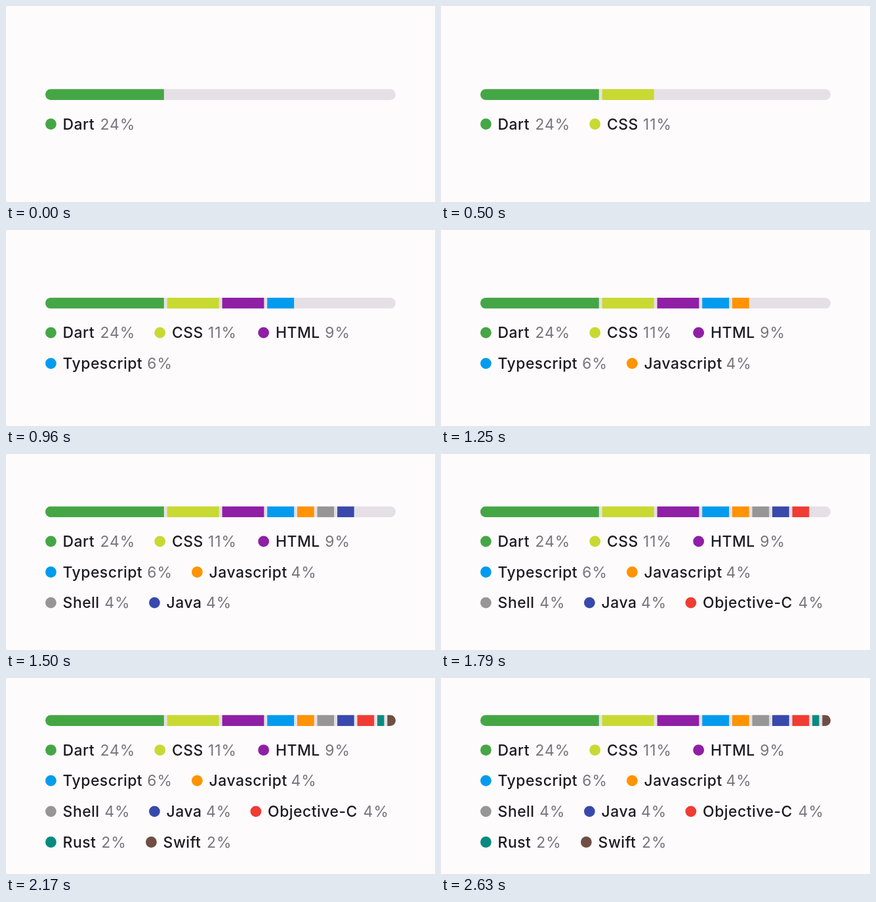
Animation of 654x298 px, one loop 2680 ms. Source, as an HTML page:

```html
<!DOCTYPE html>
<html lang="en">
<head>
<meta charset="utf-8">
<title>Language bar</title>
<style>
  html, body { margin: 0; width: 100%; height: 100%; overflow: hidden; background: #fefbfc; }
  svg { display: block; width: 654px; height: 298px; }
  text { font: 500 22.9px Inter, "Open Sans", sans-serif; letter-spacing: .5px; fill: #1c1b1f; }
  .share { font-weight: 400; letter-spacing: 1px; fill: #77747a; }
</style>
</head>
<body>
<svg viewBox="0 0 654 298">
  <defs>
    <clipPath id="pill"><rect x="60" width="534" height="16.7" rx="8.35"/></clipPath>
  </defs>
  <g id="chart">
    <g id="bar" clip-path="url(#pill)">
      <rect x="60" width="534" height="16.7" fill="#e5e0e6"/>
    </g>
  </g>
</svg>
<script>
  const LOOP = 2680, FIRST = 500, STEP = 189;
  const LEFT = 60, WIDTH = 534, ROW = 46.65, TOP = 126.2;

  // name, percent, colour, row, dot left, percent left
  const langs = [
    ['Dart', 24, '#45a645', 0, 60, 143.4],
    ['CSS', 11, '#c8d932', 0, 226.3, 308],
    ['HTML', 9, '#8f1fa5', 0, 384.3, 486.2],
    ['Typescript', 6, '#039bee', 1, 60, 215.2],
    ['Javascript', 4, '#ff9300', 1, 283, 434.5],
    ['Shell', 4, '#969696', 2, 60, 150.3],
    ['Java', 4, '#3849ab', 2, 218, 305],
    ['Objective-C', 4, '#f03c33', 2, 372.5, 544.6],
    ['Rust', 2, '#078b7e', 3, 60, 145.2],
    ['Swift', 2, '#6f4e43', 3, 213, 306]
  ];

  const chart = document.getElementById('chart');
  const bar = document.getElementById('bar');
  const total = langs.reduce((sum, lang) => sum + lang[1], 0);

  function add(parent, tag, attrs, text) {
    const el = document.createElementNS('http://www.w3.org/2000/svg', tag);
    for (const key in attrs) el.setAttribute(key, attrs[key]);
    if (text) el.textContent = text;
    parent.appendChild(el);
    return el;
  }

  let used = 0;
  const items = langs.map(([name, percent, fill, row, x, shareX], i) => {
    const start = LEFT + WIDTH * used / total + (i ? 2.6 : 0);
    used += percent;
    const end = LEFT + WIDTH * used / total - (used < total ? 2.3 : 0);
    const segment = add(bar, 'rect', { x: start, width: end - start, height: 16.7, fill });

    const cy = 53.3 + row * ROW;
    const label = add(chart, 'g', {});
    add(label, 'circle', { cx: x + 8.4, cy, r: 8.4, fill });
    add(label, 'text', { x: x + 26.6, y: cy + 8.3 }, name);
    add(label, 'text', { x: shareX, y: cy + 8.3, class: 'share' }, percent + '%');
    return [segment, label];
  });

  let shown = 0;
  function draw(now) {
    const t = now % LOOP;
    const count = t < FIRST ? 1 : Math.min(langs.length, 2 + Math.floor((t - FIRST) / STEP));
    if (count !== shown) {
      shown = count;
      items.forEach((parts, i) => parts.forEach(el => {
        el.style.display = i < count ? '' : 'none';
      }));
      const y = TOP - langs[count - 1][3] * ROW / 2;
      chart.setAttribute('transform', `translate(0 ${y})`);
    }
  }

  const origin = performance.now();
  function tick() {
    draw(performance.now() - origin);
    requestAnimationFrame(tick);
  }
  tick();
</script>
</body>
</html>
```
